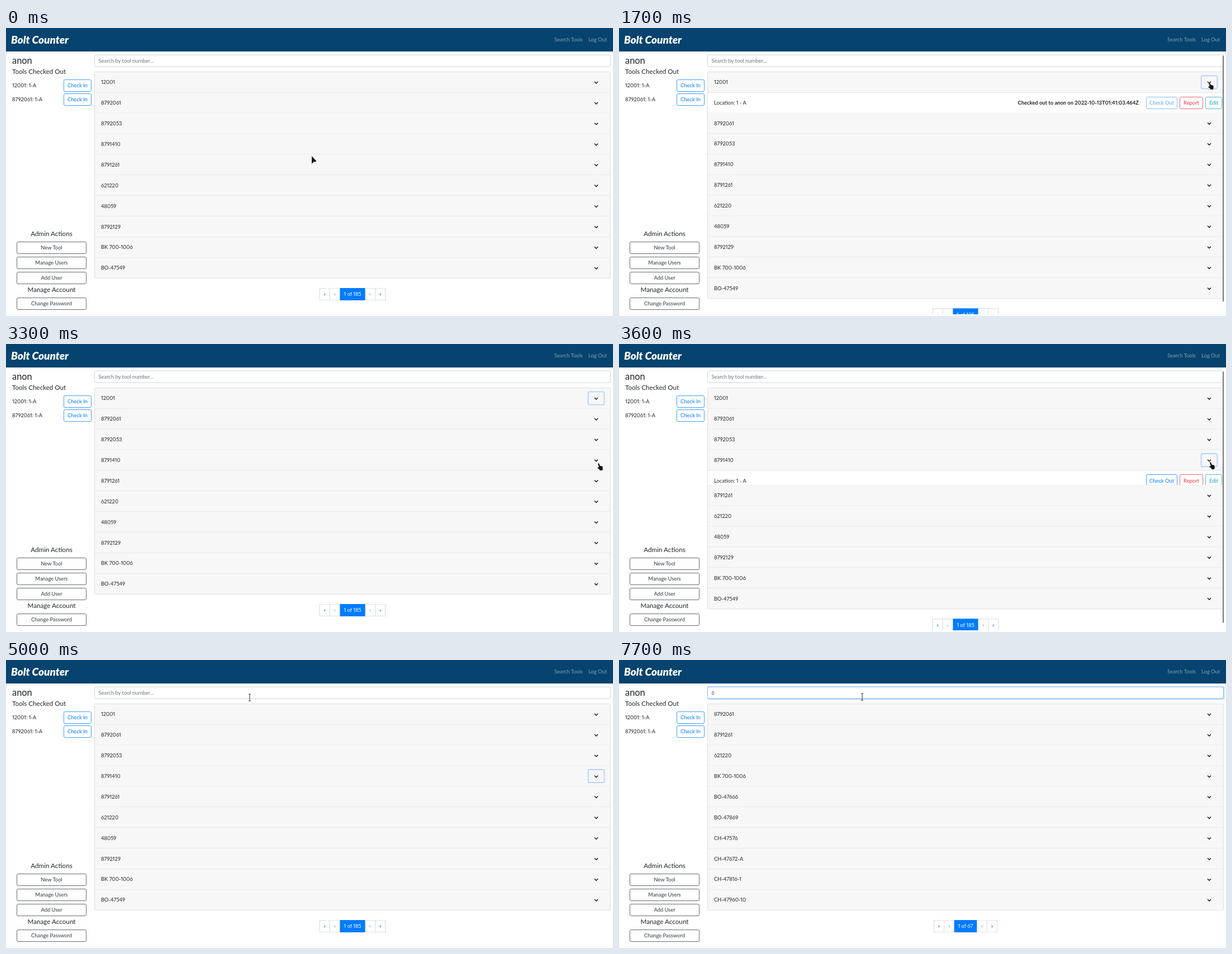
Recreate the animation shown at these times as an HTML page. Size 1086 px wide and 515 px high, loop 8 s.

```html
<!DOCTYPE html>
<html lang="en">
<head>
<meta charset="utf-8">
<title>Tool list</title>
<style>
html, body { margin: 0; width: 100%; height: 100%; overflow: hidden; background: #fff; }
svg { display: block; font-family: Lato, "Noto Sans", sans-serif; font-variant-numeric: proportional-nums; }
</style>
</head>
<body>
<svg id="stage" width="1086" height="515" viewBox="0 0 1086 515"></svg>
<script>
const stage = document.getElementById("stage");
const LOOP = 8000, STEP = 100, PITCH = 36.89, TOP = 78.5, FULL = 36.4;
const INK = "#212529", BLUE = "#007bff", DARK = "#343a40", LINE = "#dfdfdf";
const USER = "anon";
const allTools = ["12001", "8792061", "8792053", "8791410", "8791261", "621220", "48059", "8792129", "BK 700-1006", "BO-47549"];
const foundTools = ["8792061", "8791261", "621220", "BK 700-1006", "BO-47666", "BO-47869", "CH-47576", "CH-47672-A", "CH-47816-1", "CH-47960-10"];

// Pointer waypoints: time, x, y
const path = [
  [0, 547, 229], [100, 547, 229], [400, 1047, 155], [500, -50, 0], [600, -50, 0],
  [700, 1077, 108], [1000, 1055, 97], [1900, 1055, 97], [2000, 1058, 102], [2300, 1058, 102],
  [2400, 1064, 136], [2700, 1064, 136], [2800, 1064, 140], [3300, 1059, 213], [3400, 1059, 213],
  [3500, 1057, 211], [4400, 1057, 211], [4500, 985, 194], [4700, 680, 122], [4900, 455, 69],
  [5000, 436, 67], [5900, 436, 67], [6000, 435, 66], [LOOP, 435, 66]
];

const clamp = v => Math.max(0, Math.min(1, v));

// CSS "ease" curve
function ease(x) {
  let lo = 0, hi = 1;
  for (let i = 0; i < 20; i++) {
    const s = (lo + hi) / 2;
    if (0.75 * s * (1 - s) + s ** 3 < x) lo = s; else hi = s;
  }
  return 0.3 * lo * (1 - lo) ** 2 + 3 * lo * lo * (1 - lo) + lo ** 3;
}
const ramp = (t, start, span) => ease(clamp((t - start) / span));

// Text is placed by the vertical middle of its capitals
const text = (s, x, y, { size = 9.37, fill = INK, anchor = "start", extra = "" } = {}) =>
  `<text x="${x}" y="${y + size * 0.36}" font-size="${size}" fill="${fill}" text-anchor="${anchor}" ${extra}>${s}</text>`;

const box = (x, y, w, h, fill, stroke = "none", extra = "") =>
  `<rect x="${x}" y="${y}" width="${w}" height="${h}" fill="${fill}" stroke="${stroke}" ${extra}/>`;

const button = (s, x, y, w, color, opacity = 1) =>
  `<g opacity="${opacity}">` +
  box(x + 0.5, Math.floor(y - 10.5) + 0.5, w - 1, 21, "#fff", color, 'rx="2.3" stroke-width=".75"') +
  text(s, x + w / 2, y, { fill: color, anchor: "middle" }) + "</g>";

function frame() {
  const nav = { fill: "#82a1b7" };
  const heading = { size: 11.7, anchor: "middle" };
  return box(0, 0, 1086, 42, "#06436e") +
    text("Bolt Counter", 9, 21, { size: 19, fill: "#fff", extra: 'font-weight="900" font-style="italic"' }) +
    text("Search Tools", 981, 21, nav) + text("Log Out", 1042, 21, nav) +
    text(USER, 11, 58, { size: 16.4 }) +
    text("Tools Checked Out", 11, 78, { size: 11.6 }) +
    text("12001: 1-A", 11, 103) + button("Check In", 103, 103, 50, BLUE) +
    text("8792061: 1-A", 11, 127.5) + button("Check In", 103, 127.5, 50, BLUE) +
    text("Admin Actions", 81.5, 368, heading) +
    button("New Tool", 19, 392.5, 125, DARK) +
    button("Manage Users", 19, 420, 125, DARK) +
    button("Add User", 19, 447, 125, DARK) +
    text("Manage Account", 81.5, 468, heading) +
    button("Change Password", 19, 492.5, 125, DARK);
}

function searchBox(t, typed) {
  const focus = ramp(t, 5150, 200);
  const caretX = typed ? 170.5 : 165.5;
  const caretOn = t >= 5200 && t < 6500 || t >= 7500 && t < 7700;
  return box(158, 47.6, 924, 22, "none", BLUE, `stroke-width="3" rx="3" opacity="${0.25 * focus}"`) +
    box(158.5, 48, 923, 21, "#fff", "#ced4da", 'rx="2.3"') +
    box(158.5, 48, 923, 21, "none", "#80bdff", `rx="2.3" opacity="${focus}"`) +
    text(typed ? "6" : "Search by tool number...", 165.5, 58.5, { fill: typed ? "#495057" : "#6c757d" }) +
    (caretOn ? box(caretX - 0.5, 52, 1, 12, INK) : "");
}

function details(row, y, h) {
  const mid = y + 18, taken = row === 0;
  return `<clipPath id="fold">${box(158, y, 924, h, "#000")}</clipPath><g clip-path="url(#fold)">` +
    box(158, y, 924, h, "#fff") + text("Location: 1 - A", 170, mid) +
    (taken ? text(`Checked out to ${USER} on 2022-10-13T01:41:03.464Z`, 930, mid, { anchor: "end", extra: 'font-weight="700"' }) : "") +
    button("Check Out", 943, mid, 56, BLUE, taken ? 0.65 : 1) +
    button("Report", 1003, mid, 42, "#dc3545") +
    button("Edit", 1049, mid, 30, "#17a2b8") + "</g>" +
    box(158, y + h - 0.5, 924, 0.8, LINE);
}

function toolList(t, tools, open, h) {
  let out = "";
  const ringRow = t < 1300 ? -1 : t < 3500 ? 0 : 3;
  const ring = 1 - ramp(t, 5150, 200);
  tools.forEach((name, i) => {
    const y = TOP + i * PITCH + (i > open ? h : 0), mid = y + PITCH / 2;
    out += box(158.5, y, 923, PITCH, "#f7f7f7") + text(name, 170, mid);
    if (i === ringRow && ring > 0)
      out += box(1041.6, mid - 11.6, 28.8, 23.2, "none", "#b0d5fb", `stroke-width="1.8" rx="3" opacity="${ring}"`);
    out += `<path d="M1053 ${mid - 0.9}l3 3 3-3" fill="none" stroke="#111" stroke-width="1.4"/>`;
    if (i < 9) out += box(158, y + PITCH - 0.5, 924, 1, LINE);
    if (i === open && h > 0) out += details(i, y + PITCH + 0.4, h);
  });
  return out + box(158.5, TOP, 923, PITCH * 10 + h, "none", LINE, 'rx="2.3"');
}

function pager(label, half, y) {
  const cell = 18.2, left = 620 - half - 2 * cell;
  let out = box(left, y - 10.5, 2 * (620 - left), 21, "#fff", "#dee2e6", 'rx="2.3"');
  ["«", "‹", "›", "»"].forEach((s, i) => {
    const x = i < 2 ? left + i * cell : 620 + half + (i - 2) * cell;
    out += box(x, y - 10.5, cell, 21, "none", "#dee2e6") +
      text(s, x + cell / 2, y, { fill: BLUE, anchor: "middle" });
  });
  return out + box(620 - half, y - 11, half * 2, 22, BLUE) +
    text(label, 620, y, { fill: "#fff", anchor: "middle" });
}

function scrollbar(h) {
  if (h < 13) return "";
  return box(1080, 47, 6, 468, "#fff") + box(1080, 49, 2, 463 ** 2 / (450.5 + h), "#777", "none", 'rx="1"');
}

function pointer(t) {
  const k = Math.max(1, path.findIndex(p => p[0] >= t));
  const [t0, x0, y0] = path[k - 1], [t1, x1, y1] = path[k];
  const f = (t - t0) / (t1 - t0), x = x0 + (x1 - x0) * f, y = y0 + (y1 - y0) * f;
  const onButton = x > 1040 && x < 1071 && (y - 86) % PITCH < 22;
  const outline = 'fill="#111" stroke="#fff" stroke-width=".8" paint-order="stroke"';
  let shape;
  if (y > 40 && y < 69 && x > 158)
    shape = '<path d="M-2-6H2M0-6V6M-2 6H2" fill="none" stroke="#333"/>';
  else if (onButton)
    shape = `<path d="M0 1.4Q.8-.6 2.2 .9L3.6 4.8 7.2 5.6Q8.8 6.2 8.7 8V10.4L8 13H3V11.6L-.6 8.9Q-.8 7.2 .8 7.3L2 7.7Z" ${outline}/>`;
  else
    shape = `<path d="M0 0V14L3.4 10.6 8.8 9.6Z" ${outline}/>`;
  return `<g transform="translate(${x} ${y})">${shape}</g>`;
}

function render(t) {
  const typed = t >= 7500, open = t < 3000 ? 0 : 3;
  const h = FULL * (open === 0
    ? ramp(t, 1270, 350) - ramp(t, 1990, 350)
    : ramp(t, 3450, 350) - ramp(t, 4047, 350));
  return frame() +
    '<clipPath id="view"><path d="M158 47H1086V512H158Z"/></clipPath><g clip-path="url(#view)">' +
    searchBox(t, typed) +
    toolList(t, typed ? foundTools : allTools, open, h) +
    pager(typed ? "1 of 67" : "1 of 185", typed ? 20.2 : 22.5, 476 + h) +
    scrollbar(h) + "</g>" + pointer(t);
}

let shown = -1;
function tick(now) {
  const t = Math.floor(now % LOOP / STEP) * STEP;
  if (t !== shown) stage.innerHTML = render(shown = t);
  requestAnimationFrame(tick);
}
requestAnimationFrame(tick);
</script>
</body>
</html>
```
